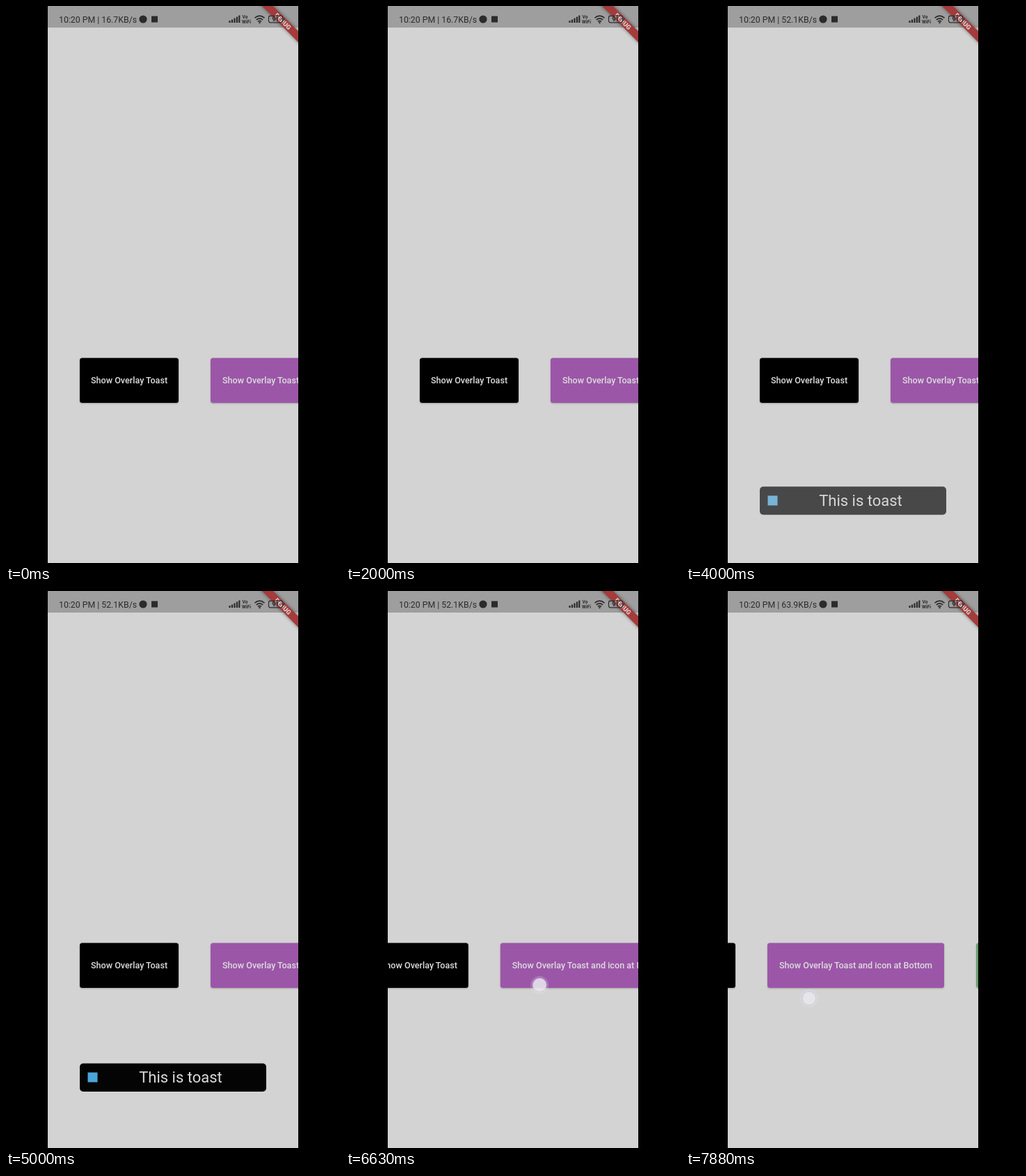
An HTML page that plays this animation: 480x800 px, repeating every 8 s.

```html
<!DOCTYPE html>
<html lang="en">
<head>
<meta charset="utf-8">
<title>Overlay toast</title>
<style>
  html, body { margin: 0; width: 100%; height: 100%; overflow: hidden; background: #000; }
  svg { display: block; }
  text { font-family: Roboto, sans-serif; }
  .label { font-size: 12.6px; font-weight: 500; fill: #dcdcdc; text-anchor: middle; }
  .tiny { font-size: 6.6px; font-weight: 700; }
</style>
</head>
<body>
<svg width="100%" height="100%" viewBox="0 0 480 800">
  <defs>
    <filter id="blur" x="-20%" y="-100%" width="140%" height="300%"><feGaussianBlur stdDeviation="2.5"/></filter>
    <filter id="lift"><feDropShadow dx="0" dy="1" stdDeviation="1" flood-opacity=".25"/></filter>
  </defs>
  <rect width="480" height="800"/>
  <svg x="60" width="360" height="800" viewBox="60 0 360 800">
    <rect x="60" width="360" height="800" fill="#d3d3d3"/>
    <rect x="60" width="360" height="31" fill="#9e9e9e"/>

    <g id="buttons">
      <g filter="url(#lift)">
        <rect x="106" y="505.5" width="142" height="64.5" rx="3.5"/>
        <rect x="294" y="505.5" width="254" height="64.5" rx="3.5" fill="#9c56a8"/>
        <rect x="594" y="505.5" width="254" height="64.5" rx="3.5" fill="#6c9f70"/>
      </g>
      <text class="label" x="177" y="542">Show Overlay Toast</text>
      <text class="label" x="421" y="542">Show Overlay Toast and icon at Bottom</text>
    </g>

    <g id="toast">
      <rect x="106" width="268" height="40.5" rx="5" fill="#040404"/>
      <rect x="117.5" y="13" width="14" height="14" fill="#4aa5da"/>
      <text x="251" y="27.7" font-size="22" fill="#dadada" text-anchor="middle">This is toast</text>
    </g>

    <g id="touch">
      <circle r="13" fill="#eef" opacity=".2"/>
      <circle r="9.8" fill="#e8e6ec" fill-opacity=".86" stroke="#c3c4d2" stroke-opacity=".7"/>
    </g>

    <g transform="translate(420) rotate(45)">
      <rect x="-40" y="25.7" width="80" height="11" opacity=".5" filter="url(#blur)"/>
      <rect x="-40" y="25.7" width="80" height="11" fill="#a53b3b"/>
      <text y="34.5" font-size="9.2" font-weight="900" fill="#d8d0d0" text-anchor="middle">DEBUG</text>
    </g>

    <g fill="#2b2b2b">
      <text x="76" y="23.8" font-size="12.3">10:20 PM | <tspan id="speed"></tspan></text>
      <circle cx="197" cy="19" r="5.6"/>
      <rect x="209" y="14.5" width="9" height="9"/>
      <path d="M321.5 24v-3M325 24v-4.5M328.5 24v-6.5M332 24v-8.5M335.3 24v-10.5" stroke="#2b2b2b" stroke-width="2.2"/>
      <text class="tiny" x="339.5" y="18">Vo</text>
      <text class="tiny" x="339" y="25">WiFi</text>
      <g fill="none" stroke="#2b2b2b" stroke-width="1.7">
        <path d="M357.5 17.2q7-6 14 0M359.8 19.9q4.700-4 9.400 0M362 22.300q2.500-2 5 0"/>
        <rect x="377.5" y="14.2" width="20" height="9.600" rx="2.500" stroke-width="1.200"/>
      </g>
      <circle cx="364.500" cy="24" r="1.200"/>
      <rect x="398.500" y="17" width="1.500" height="4"/>
      <text x="387.500" y="22.200" font-size="8.500" font-weight="700" text-anchor="middle">91</text>
    </g>
  </svg>
</svg>
<script>
  const LOOP = 8000, STEP = 125, SCROLL = 177;
  const [buttons, toast, touch, speed] =
    ['buttons', 'toast', 'touch', 'speed'].map(id => document.getElementById(id));
  const progress = (t, from, to) => Math.min(1, Math.max(0, (t - from) / (to - from)));
  const move = (el, x, y) => el.setAttribute('transform', `translate(${x} ${y})`);
  const show = (el, visible) => el.setAttribute('visibility', visible ? 'visible' : 'hidden');

  function draw(t) {
    speed.textContent = t < 3375 ? '16.7KB/s' : t < 7375 ? '52.1KB/s' : '63.9KB/s';

    // The toast rises while fading in, then vanishes at once.
    const rise = progress(t, 3000, 4500);
    move(toast, 0, 714 - 35.5 * rise);
    toast.setAttribute('opacity', rise);
    show(toast, t >= 3000 && t < 6000);

    // The finger drags the row of buttons and slows to a stop.
    const remaining = SCROLL * (1 - progress(t, 6450, 7875)) ** 4;
    move(buttons, remaining - SCROLL, 0);
    move(touch, 177 + remaining * 0.966, 585 - remaining * 0.182);
    show(touch, t >= 6500);
  }

  const start = performance.now();
  function frame() {
    const t = (performance.now() - start) % LOOP;
    draw(Math.floor(t / STEP) * STEP);
    requestAnimationFrame(frame);
  }
  frame();
</script>
</body>
</html>
```
